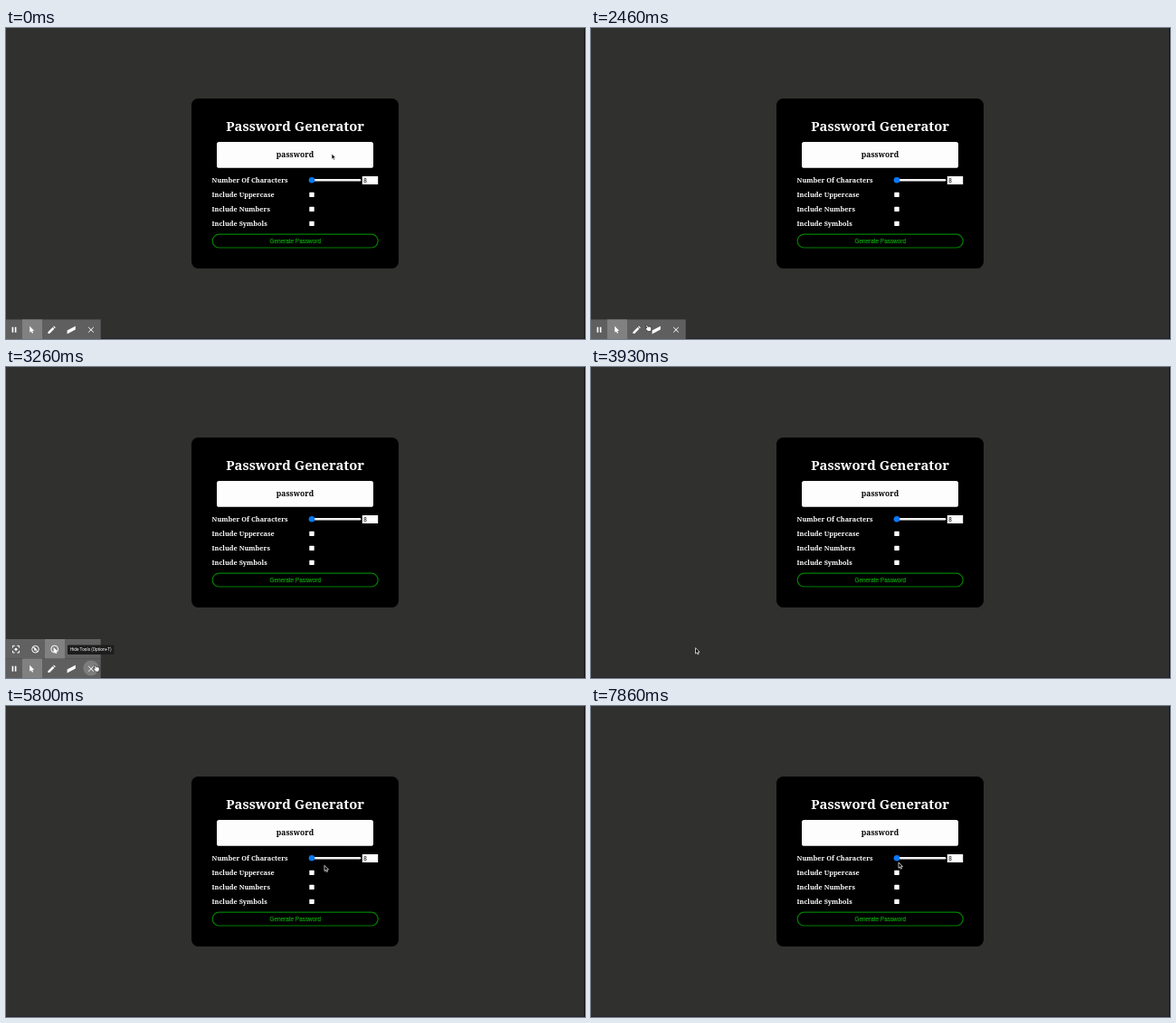
An HTML page for the animation above (8 s loop, 640 px wide and 344 px high).

```html
<!DOCTYPE html>
<html lang="en">
<head>
<meta charset="utf-8">
<title>Password Generator</title>
<style>
  html, body { margin: 0; width: 100%; height: 100%; overflow: hidden; background: #30302f; }
  svg { display: block; width: 100vw; height: 100vh; }
  .serif { font-family: "Noto Serif", serif; font-weight: 700; fill: #fff; }
  .sans { font-family: "Liberation Sans", sans-serif; font-size: 6.4px; }
  .mid { text-anchor: middle; }
  .icon { fill: none; stroke: #fff; stroke-width: 1; }
  .solid { fill: #fff; }
</style>
</head>
<body>
<svg viewBox="0 0 640 344">
  <defs>
    <path id="pointer" d="M0 0V7L1.6 5.6 2.7 8 3.9 7.5 2.9 5.1H5Z"/>
  </defs>
  <rect width="640" height="344" fill="#30302f"/>
  <rect y="343" width="640" height="1" fill="#2a2428"/>
  <rect x="639" width="1" height="344" fill="#111"/>

  <rect x="205" y="78" width="229" height="188" rx="7.5"/>
  <text class="serif mid" x="319.6" y="113.7" font-size="14.8">Password Generator</text>
  <rect x="233" y="126" width="173" height="28.8" rx="2.6" fill="#fdfdfd"/>
  <text class="serif mid" x="319.5" y="143.4" font-size="8.5" style="fill:#000">password</text>
  <g id="labels" class="serif" font-size="7.35"></g>

  <rect x="335" y="167" width="57.3" height="2.5" rx="1.2" fill="#f4f4f4"/>
  <circle cx="338" cy="168.2" r="3.3" fill="#0b78f5"/>
  <rect x="393.8" y="164" width="17.4" height="9" fill="#fff"/>
  <text class="sans" x="395.2" y="170.8">8</text>
  <g id="boxes" fill="#fff"></g>
  <rect x="228.2" y="228.2" width="183" height="14.8" rx="7.4" fill="none" stroke="#008000" stroke-width="1.2"/>
  <text class="sans mid" x="319.7" y="237.9" fill="#0b930b" stroke="#0b930b" stroke-width=".25">Generate Password</text>

  <g id="toolbar">
    <rect y="322.4" width="104.7" height="21.6" fill="#5f5f5f"/>
    <rect x="18" y="322.4" width="22" height="21.6" fill="#818181"/>
    <circle id="closeHover" cx="94" cy="333" r="8.6" fill="#7d7d7d"/>
    <path class="solid" d="M6.6 330.8h1.6v6h-1.6zM9.8 330.8h1.6v6h-1.6z"/>
    <use href="#pointer" class="solid" x="26.2" y="329.8"/>
    <path class="solid" d="M46.4 338v-1.8l5.2-5.2 1.8 1.8-5.2 5.2zM52.2 330.4l.8-.8 1.8 1.8-.8.8z"/>
    <path class="solid" d="M67.6 334.6 76.8 329.8V333.4L67.6 338.4Z"/>
    <path class="icon" d="M91.2 331l5.6 5.6M96.8 331l-5.6 5.6"/>
  </g>
  <g id="options">
    <rect y="301" width="104.7" height="21.4" fill="#616161"/>
    <rect x="43" y="301" width="22" height="21.4" fill="#818181"/>
    <path class="icon" d="M7.5 310.6v-2.2h2.2M12.3 308.4h2.2v2.2M14.5 313.8v2.2h-2.2M9.7 316h-2.2v-2.2"/>
    <circle class="solid" cx="11" cy="312.2" r="1.5"/>
    <circle class="icon" cx="32.5" cy="312.2" r="3.8"/>
    <path class="icon" d="M29.8 309.5l5.4 5.4"/>
    <use href="#pointer" class="solid" transform="translate(31.2 309.4) scale(.65)"/>
    <circle class="icon" cx="53.7" cy="312" r="3.9"/>
    <use href="#pointer" class="solid" transform="translate(52.6 310) scale(.9)"/>
  </g>
  <g id="tooltip">
    <rect x="68" y="307.4" width="51.5" height="10.6" rx="1" fill="#1d1d1d"/>
    <text x="93.8" y="314.3" class="mid" fill="#fff" font-size="4.7" font-family="Roboto, sans-serif">Hide Tools (Option+T)</text>
  </g>

  <use id="arrow" href="#pointer" fill="#000" stroke="#fff" stroke-width=".8"/>
  <path id="hand" fill="#fff" stroke="#000" stroke-width=".5" stroke-linejoin="round"
    d="M-.9 .4Q-.1-.6 .6 .4L1.5 2 2.8 1.7 3.9 1.9 4.9 2.4 5.2 4.6 4.5 7H1.5L-.8 4.8Q-1-.1 .3 3.5Z"/>
</svg>
<script>
const LOOP = 8000;
const $ = id => document.getElementById(id);

["Number Of Characters", "Include Uppercase", "Include Numbers", "Include Symbols"].forEach((label, i) => {
  const y = 168.4 + 16 * i;
  $("labels").innerHTML += `<text x="227.6" y="${y + 2.7}">${label}</text>`;
  if (i) $("boxes").innerHTML += `<rect x="335.3" y="${y - 2.7}" width="5.4" height="5.4" rx=".9"/>`;
});

const home = { x: 360, y: 139 };
const moves = [
  { from: 0, to: 200, x: 340, y: 158 },
  { from: 1260, to: 1400, x: 361, y: 141 },
  { from: 1400, to: 1730, x: 346, y: 168 },
  { from: 1930, to: 2460, x: 61.5, y: 328.5 },  // toolbar
  { from: 2530, to: 2860, x: 30, y: 332 },      // pointer tool
  { from: 2860, to: 3260, x: 98, y: 330 },      // close
  { from: 3860, to: 3930, x: 115.5, y: 310.7 },
  { from: 3930, to: 4730, x: 352, y: 178 },     // back to the slider
  { from: 5730, to: 5860, x: 352, y: 175 },
  { from: 5930, to: 6330, x: 338.5, y: 168 },
  { from: 6660, to: 6800, x: 536, y: -3.5 },    // top edge
  { from: 7260, to: 7860, x: 340, y: 173 }
];

function snap(t) {
  const index = Math.floor((Math.floor(t / 10) + 1) * 0.15 - 1e-6);
  return Math.floor(index * 20 / 3) * 10;
}

const smooth = k => k * k * (3 - 2 * k);

function pointerAt(t) {
  let { x, y } = home;
  for (const move of moves) {
    const k = smooth(Math.min(1, Math.max(0, (t - move.from) / (move.to - move.from))));
    x += (move.x - x) * k;
    y += (move.y - y) * k;
  }
  return { x, y };
}

function show(id, visible) {
  $(id).style.display = visible ? "" : "none";
}

function draw(time) {
  const t = snap(time % LOOP);
  const { x, y } = pointerAt(t);
  const tools = t < 3460;
  const overTools = tools && x < 105 && y > 322;
  show("toolbar", tools);
  show("options", tools && t >= 2800);
  show("closeHover", overTools && x > 84);
  show("tooltip", tools && t >= 3200);
  show("arrow", !overTools);
  show("hand", overTools);
  $("arrow").setAttribute("transform", `translate(${x} ${y}) scale(.9)`);
  $("hand").setAttribute("transform", `translate(${x} ${y})`);
}

const start = performance.now();
function tick() {
  draw(performance.now() - start);
  requestAnimationFrame(tick);
}
tick();
</script>
</body>
</html>
```
